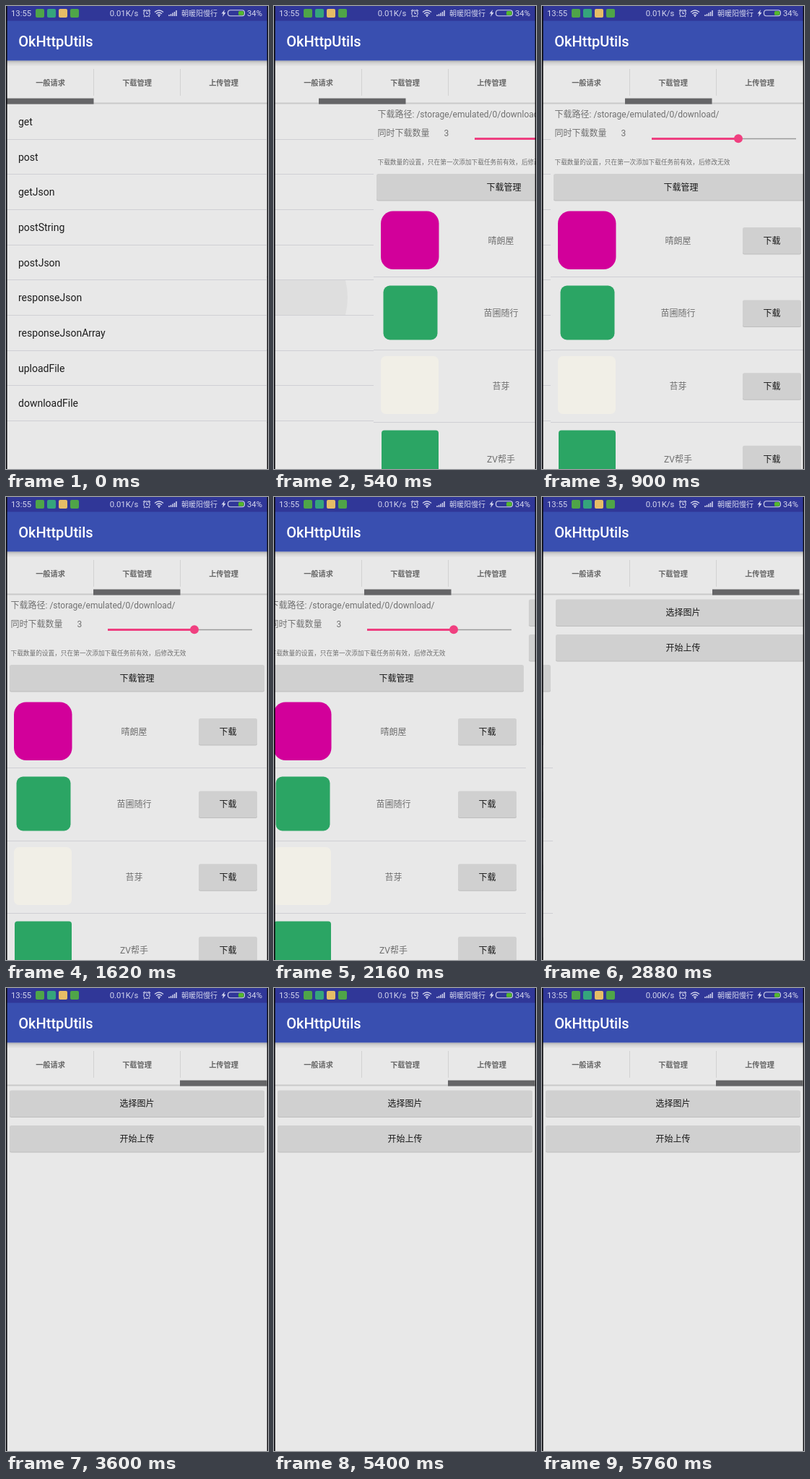
Animation of 363 by 640 pixels, one loop 5940 ms. Source, as an HTML page:

```html
<!DOCTYPE html>
<html lang="zh-CN">
<head>
<meta charset="utf-8">
<title>OkHttpUtils</title>
<style>
  html, body { margin: 0; width: 100%; height: 100%; overflow: hidden; background: #e8e8e8; }
  svg { display: block; width: 100vw; height: 100vh; }
  text { font-family: Roboto, "Noto Sans CJK SC", "Noto Sans CJK", sans-serif; font-size: 12px; fill: #707070; }
  .mid { text-anchor: middle; }
  .status text { font-size: 11.3px; fill: #d4d6ee; }
  .status .carrier { font-size: 10px; }
  .title { font-size: 20px; font-weight: 500; fill: #fff; }
  .tab { font-size: 10.2px; font-weight: 700; fill: #666; }
  .item { font-size: 14px; fill: #1c1c1c; }
  .note { font-size: 8.68px; }
  .label { fill: #181818; }
  .rule { fill: #cfcfd4; }

  #pager, #marker, #press, .speed { animation: 5940ms step-end infinite; }
  #pager { animation-name: swipe; }
  #marker { animation-name: mark; }
  #press { animation-name: press; }
  .busy { animation-name: busy; }
  .idle { animation-name: idle; }

  @keyframes swipe {
    0% { transform: translateX(0); }
    3.03% { transform: translateX(-16px); }
    6.06% { transform: translateX(-90px); }
    9.09% { transform: translateX(-223px); }
    12.12% { transform: translateX(-318px); }
    15.15% { transform: translateX(-349px); }
    18.18% { transform: translateX(-360px); }
    36.36% { transform: translateX(-372px); }
    39.39% { transform: translateX(-430px); }
    42.42% { transform: translateX(-522px); }
    45.45% { transform: translateX(-645px); }
    48.48% { transform: translateX(-706px); }
    51.51%, 100% { transform: translateX(-720px); }
  }
  @keyframes mark {
    0% { transform: translateX(0); }
    3.03% { transform: translateX(4px); }
    6.06% { transform: translateX(28px); }
    9.09% { transform: translateX(61px); }
    12.12% { transform: translateX(102px); }
    15.15% { transform: translateX(114px); }
    18.18% { transform: translateX(120px); }
    36.36% { transform: translateX(124px); }
    39.39% { transform: translateX(143px); }
    42.42% { transform: translateX(173px); }
    45.45% { transform: translateX(213px); }
    48.48% { transform: translateX(235px); }
    51.51%, 100% { transform: translateX(240px); }
  }
  @keyframes press {
    0%, 12.12%, 100% { opacity: 0; }
    3.03% { opacity: .5; }
    6.06% { opacity: 1; }
  }
  @keyframes busy { 0% { opacity: 1; } 96.96%, 100% { opacity: 0; } }
  @keyframes idle { 0% { opacity: 0; } 96.96%, 100% { opacity: 1; } }
</style>
</head>
<body>
<svg viewBox="0 0 363 640" preserveAspectRatio="none">
  <defs>
    <linearGradient id="shade" x2="0" y2="1">
      <stop offset="0" stop-color="#000" stop-opacity=".24"/>
      <stop offset=".4" stop-color="#000" stop-opacity=".09"/>
      <stop offset="1" stop-color="#000" stop-opacity="0"/>
    </linearGradient>
    <clipPath id="body"><rect x="1" y="135" width="361" height="505"/></clipPath>
  </defs>
  <rect width="363" height="640" fill="#e8e8e8"/>

  <g clip-path="url(#body)">
    <g id="pager">
      <g id="requests">
        <path id="press" d="M1 379H322Q328 403 322 427H1Z" fill="#dedede"/>
      </g>
      <g id="downloads" transform="translate(360)">
        <text x="6.5" y="154">下载路径: /storage/emulated/0/download/</text>
        <text x="6.5" y="180">同时下载数量</text>
        <text x="98.5" y="180">3</text>
        <path d="M141 183.5H341" stroke="#9b9b9b" stroke-width="1.4"/>
        <path d="M141 183.5H261" stroke="#ee3f80" stroke-width="3"/>
        <circle cx="261" cy="183.3" r="6" fill="#f04080"/>
        <text class="note" x="6.5" y="218.5">下载数量的设置，只在第一次添加下载任务前有效，后修改无效</text>
      </g>
      <g id="uploads" transform="translate(720)"></g>
    </g>
  </g>

  <rect y="75.5" width="363" height="8" fill="url(#shade)"/>
  <g id="tabs">
    <rect x="1" y="133.5" width="361" height="2" fill="#c9c9c9"/>
    <path d="M121.5 87V124M241.5 87V124" stroke="#d2d2d2"/>
    <rect id="marker" x="1" y="127.6" width="120.5" height="8" fill="#656567"/>
  </g>

  <rect y="20" width="363" height="55.5" fill="#394fb0"/>
  <text class="title" x="17.3" y="56">OkHttpUtils</text>

  <rect width="363" height="20.5" fill="#303798"/>
  <g class="status">
    <text x="7" y="14">13:55</text>
    <g>
      <rect x="41" y="4" width="12" height="12" rx="2" fill="#4fa548"/>
      <rect x="57" y="4" width="12" height="12" rx="2" fill="#35a57c"/>
      <rect x="73" y="4" width="12" height="12" rx="2" fill="#e6bd66"/>
      <rect x="89" y="4" width="12" height="12" rx="2" fill="#4fa548"/>
    </g>
    <g text-anchor="end">
      <text class="speed busy" x="183.3" y="14">0.01K/s</text>
      <text class="speed idle" x="183.3" y="14">0.00K/s</text>
    </g>
    <g fill="none" stroke="#d4d6ee" stroke-width="1.1">
      <circle cx="195" cy="10.2" r="4.2"/>
      <path d="M195 7.5V10.5H197M190 7L192.5 4.8M200 7L197.5 4.8M192 14L191 15M198 14L199 15"/>
      <path d="M206 8.5Q212 3.5 218 8.5M208 10.7Q212 7.3 216 10.7M210 12.7Q212 11 214 12.7" stroke-width="1.3"/>
      <rect x="307.5" y="5.8" width="23" height="8" rx="3.5"/>
    </g>
    <circle cx="212" cy="14" r="1.1" fill="#d4d6ee"/>
    <path d="M226 14V12M228.5 14V11M231 14V9.5M233.5 14V8M236 14V6" stroke="#d4d6ee" stroke-width="1.5"/>
    <text class="carrier" x="243" y="13.5">朝暖阳慢行</text>
    <path d="M303 5L298.5 10.5H301L300 15L304.5 9H302Z" fill="#d4d6ee"/>
    <rect x="322" y="7" width="7.5" height="5.8" rx="1.5" fill="#54b82c"/>
    <text x="334" y="14">34%</text>
  </g>
  <path d="M0 0H1.6V640H0ZM361.7 0H363V640H361.7Z" fill="#08080c"/>
</svg>
<script>
  const byId = id => document.getElementById(id);

  function add(parent, tag, attrs, content = '') {
    const node = document.createElementNS('http://www.w3.org/2000/svg', tag);
    for (const key in attrs) node.setAttribute(key, attrs[key]);
    node.textContent = content;
    parent.append(node);
  }

  function button(parent, x, y, width, label) {
    const box = { x, width, height: 36.5, rx: 2.5 };
    add(parent, 'rect', { ...box, y: y + 1, fill: '#bebebe' });
    add(parent, 'rect', { ...box, y, fill: '#d0d0d0' });
    add(parent, 'text', { x: x + width / 2, y: y + 22.7, class: 'label mid' }, label);
  }

  const rule = (parent, y) => add(parent, 'rect', { x: 1, y, width: 360, height: 1, class: 'rule' });

  const requests = byId('requests');
  ['get', 'post', 'getJson', 'postString', 'postJson', 'responseJson',
    'responseJsonArray', 'uploadFile', 'downloadFile'].forEach((name, i) => {
    const y = 48.67 * i;
    add(requests, 'text', { x: 17, y: 165 + y, class: 'item' }, name);
    rule(requests, Math.round(183.6 + y));
  });

  const downloads = byId('downloads');
  button(downloads, 5, 232, 353, '下载管理');
  const apps = [
    { name: '晴朗屋', color: '#d2009a', x: 11, y: 283.5, size: 80.5, radius: 17 },
    { name: '苗圃随行', color: '#2ba564', x: 14.5, y: 386.5, size: 75, radius: 9 },
    { name: '苔芽', color: '#f1efe7', x: 11, y: 484, size: 80, radius: 7 },
    { name: 'ZV帮手', color: '#2ba564', x: 12, y: 586.5, size: 79, radius: 4 }
  ];
  apps.forEach(({ name, color, x, y, size, radius }, i) => {
    const top = 100.6 * i;
    add(downloads, 'rect', { x, y, width: size, height: size, rx: radius, fill: color });
    add(downloads, 'text', { x: 177.5, y: 328.7 + top, class: 'mid' }, name);
    button(downloads, 267, 306 + top, 81, '下载');
    rule(downloads, Math.round(374 + top));
  });

  const uploads = byId('uploads');
  button(uploads, 5, 141.5, 353, '选择图片');
  button(uploads, 5, 190, 353, '开始上传');

  ['一般请求', '下载管理', '上传管理'].forEach((name, i) =>
    add(byId('tabs'), 'text', { x: 61.5 + 120 * i, y: 109.5, class: 'tab mid' }, name));
</script>
</body>
</html>
```
